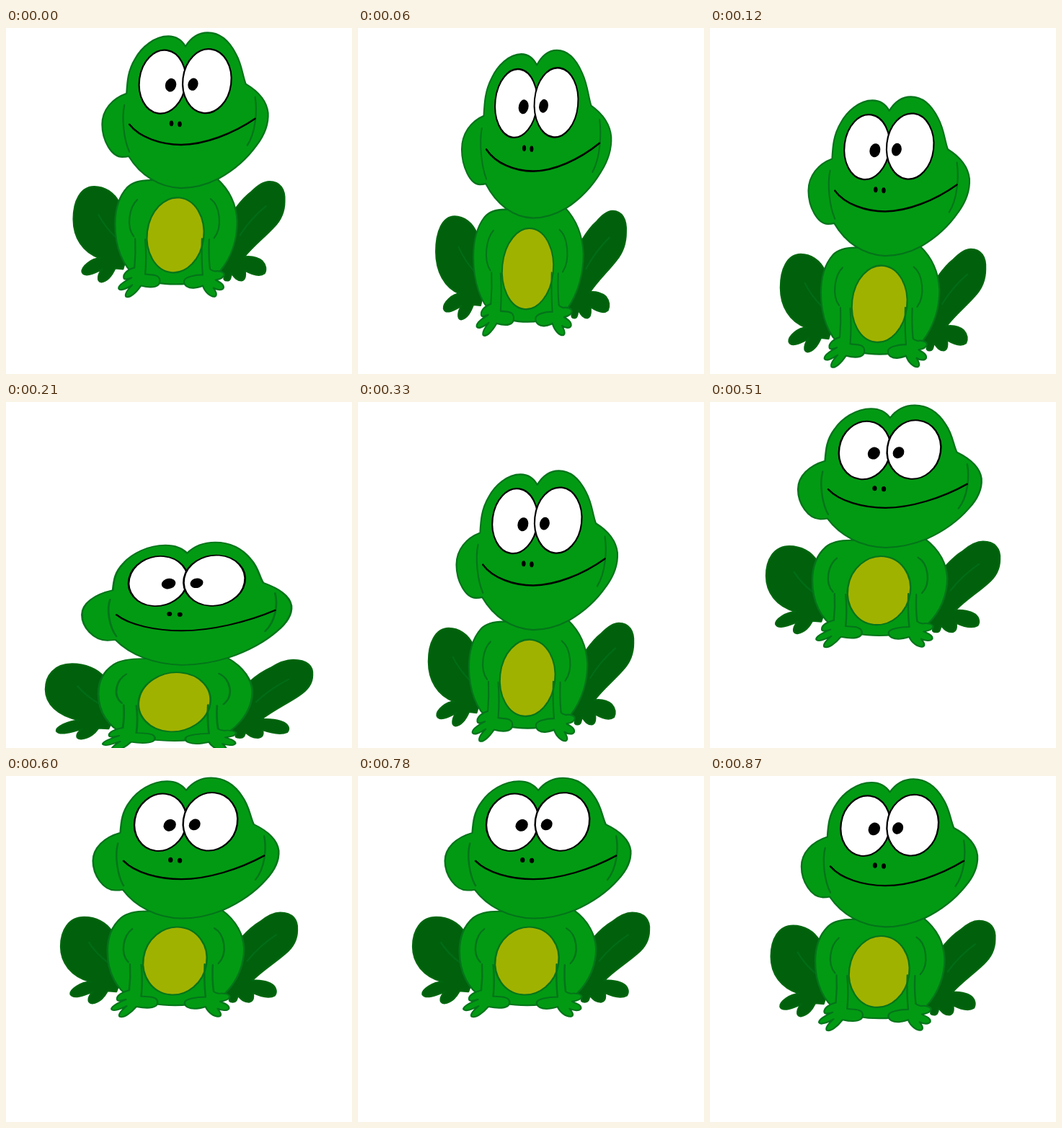
These frames come from a looping animation (480x480 px, 900 ms). An HTML page:

```html
<!DOCTYPE html>
<html lang="en">
<head>
<meta charset="utf-8">
<title>Bouncing frog</title>
<style>
  html, body { margin: 0; width: 100%; height: 100%; overflow: hidden; background: #fff; }
  svg { display: block; width: 100vw; height: 100vh; }
  .leg { fill: #01600c; stroke: #01660f; }
  .legline { fill: none; stroke: #016c17; }
  .skin { fill: #029a13; stroke: #04741a; }
  .fill { fill: #029a13; stroke: none; }
  .line { fill: none; stroke: #04741a; }
  .belly { fill: #a0b200; stroke: #04741a; }
  .eye { fill: #fff; stroke: #000; }
  .mouth { fill: none; stroke: #000; stroke-width: 2.5; }
</style>
</head>
<body>
<svg viewBox="0 0 480 480">
  <g id="frog" stroke-width="2.2" stroke-linecap="round" stroke-linejoin="round">
    <!-- back legs -->
    <path class="leg" d="M157 243C150 228 136 220 122 220C103 220 93 240 93 265C93 290 106 311 130 319C118 319 104 331 105 338C108 346 122 340 133 334C127 341 125 351 132 352C142 350 147 342 151 333L162 334L175 290Z"/>
    <path class="leg" d="M319 250C328 238 334 232 341 227C349 219 357 213 366 213C381 213 388 224 387 240C387 256 380 268 372 276C359 290 344 301 331 317C340 316 350 318 356 323C361 328 362 335 359 340C352 345 341 341 332 336C333 343 332 349 327 350C320 350 317 345 313 340C312 347 311 350 307 350C303 350 302 348 303 345L295 330L300 280Z"/>
    <path class="legline" d="M128 259Q137 276 152 290M361 247Q340 264 325 287"/>

    <!-- body -->
    <path class="skin" d="M200 211C184 211 174 215 168 221C156 234 151 252 151 272C151 304 162 331 180 343C200 352 215 355 235 355C260 355 283 348 297 337C313 318 321 293 321 268C320 248 312 226 293 209Z"/>
    <ellipse class="belly" cx="235" cy="287" rx="39.5" ry="52" transform="rotate(7 235 287)"/>

    <!-- front legs -->
    <path class="fill" d="M178 330H193V343L178 336ZM272 330H283V336L273 344Z"/>
    <path class="skin" d="M178 332C170 334 162 340 163 346C164 350 170 347 174 346C166 350 155 356 156 361C158 365 167 361 175 356C170 361 164 368 166 372C171 375 180 367 187 357C195 359 206 360 211 356C215 352 214 345 208 343C203 341 197 342 193 341"/>
    <path class="skin" d="M273 342C262 342 247 345 247 351C247 357 253 361 262 360C268 359 271 358 273 357C276 366 284 373 290 372C294 370 291 365 288 360C293 363 300 364 302 360C303 355 297 352 291 349C297 348 302 346 303 342C303 337 294 336 290 337C286 336 283 335 283 333"/>
    <path class="line" d="M182 238C171 248 166 275 177 289M179 292Q180 312 178 332M193 293Q195 318 193 341M284 237C297 246 301 276 289 291M282 293Q281 314 283 333M272 292Q271 318 273 342"/>

    <!-- head -->
    <path class="skin" d="M249 26C243 16 235 12 225 12C206 12 188 27 179 43C169 59 168 74 167 91C147 98 133 114 133 134C133 156 146 179 161 179Q166 179 170 178C186 204 212 221 243 222C262 222 281 216 295 209C317 197 335 181 348 163C358 150 365 135 364 118C362 100 350 88 333 78C328 65 328 52 319 36C309 17 296 7 280 7C265 7 256 15 249 26Z"/>
    <path class="line" d="M164 107C160 125 163 155 171 172M346 96C349 115 347 145 335 163"/>
    <ellipse class="eye" cx="217" cy="75" rx="32.3" ry="44" transform="rotate(8 217 75)"/>
    <ellipse class="eye" cx="279" cy="74" rx="33.7" ry="44.5" transform="rotate(7 279 74)"/>
    <ellipse cx="228.5" cy="79.5" rx="7.6" ry="9.4" transform="rotate(18 228.5 79.5)"/>
    <ellipse cx="259.5" cy="78.5" rx="7" ry="8.8" transform="rotate(18 259.5 78.5)"/>
    <ellipse cx="229.5" cy="132.5" rx="2.8" ry="3.9"/>
    <ellipse cx="241" cy="133.5" rx="2.8" ry="3.9"/>
    <path class="mouth" d="M171 134C185 152 215 162 243 162C275 162 315 147 346 126"/>
  </g>
</svg>
<script>
  const STEP = 30, COUNT = 30, HALF = COUNT / 2;
  const CX = 240, CY = 189.5;
  const frog = document.getElementById("frog");

  const ease = (from, to, x) => {
    const u = Math.min(1, Math.max(0, (x - from) / (to - from)));
    return u * u * (3 - 2 * u);
  };

  // Centre height: a cosine bounce sharpened by two harmonics
  const height = a => 222 - 81 * Math.cos(a) + 32.5 * Math.cos(2 * a) - 5 * Math.cos(3 * a);

  // Wide at the top, slim while moving, squashed at the bottom
  const widening = fall => 0.115 - 0.225 * ease(4.7, 10.1, fall) + 0.375 * ease(10.1, 14.9, fall);

  function draw(ms) {
    const i = Math.floor(ms / STEP) % COUNT;
    // Steps below the top of the bounce, mirrored on the way up
    const fall = HALF - Math.abs((i + 37.5) % COUNT - HALF);
    const y = height(Math.PI * fall / HALF);
    const w = widening(fall);
    frog.setAttribute("transform",
      `translate(${CX} ${y}) scale(${1 + w} ${1 - 0.81 * w}) translate(${-CX} ${-CY})`);
  }

  let start;
  function tick(now) {
    start ??= now;
    draw(Math.max(0, now - start));
    requestAnimationFrame(tick);
  }
  draw(0);
  requestAnimationFrame(tick);
</script>
</body>
</html>
```
